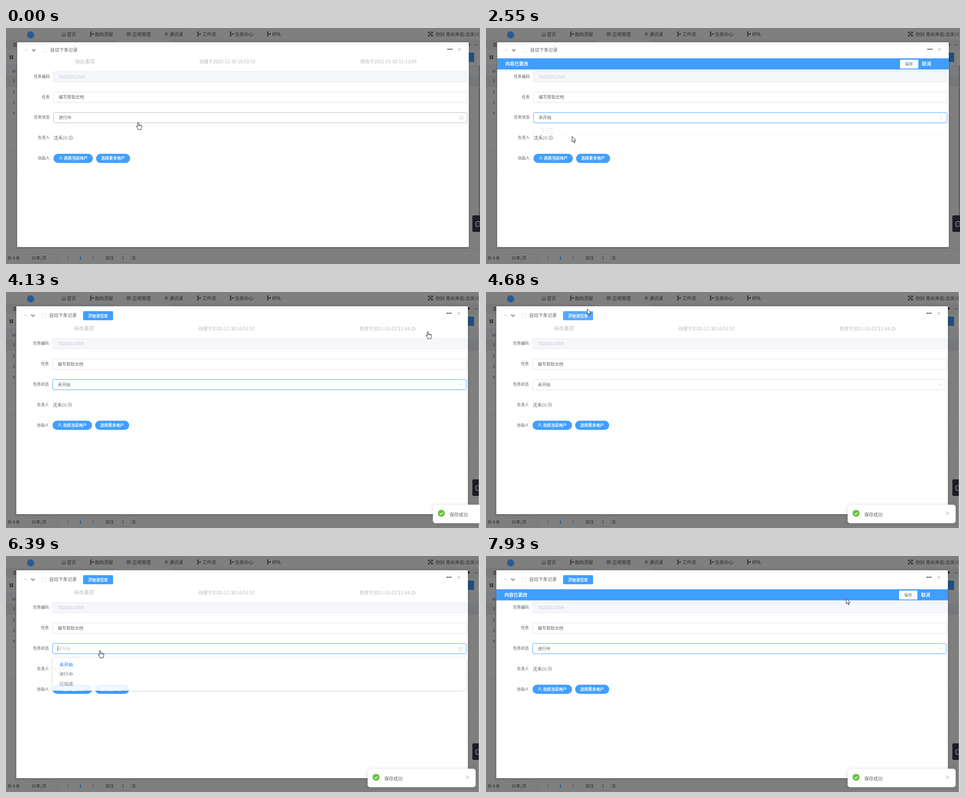
These frames come from a looping animation (1058x529 px, 8000 ms). An HTML page:

```html
<!DOCTYPE html>
<html lang="zh-CN">
<head>
<meta charset="utf-8">
<title>任务表单</title>
<style>
html, body { margin: 0; width: 100%; height: 100%; overflow: hidden; background: #7f7f7f; }
svg { display: block; width: 1058px; height: 529px; }
text { font-family: "Noto Sans CJK SC", "Noto Sans CJK", "Noto Sans", sans-serif; }
.shadow { filter: drop-shadow(0 1px 4px rgba(0,0,0,.13)); }
</style>
</head>
<body>
<svg id="stage" viewBox="0 0 1058 529" xmlns="http://www.w3.org/2000/svg"></svg>
<script>
const LOOP = 8000;
const BLUE = '#409eff', INK = '#606266', PALE = '#c0c4cc', LINE = '#dcdfe6';
const DARK = '#292a2c', DIM_LINE = '#737477', DIM_BLUE = '#204f7f';
const S = 8.8, M = 9.5, L = 10.24;

// Markup helpers; text is placed by its vertical centre.
const text = (x, cy, str, size, fill, extra = '') =>
  `<text x="${x}" y="${cy + size * .375}" font-size="${size}" fill="${fill}" ${extra}>${str}</text>`;
const rect = (x, y, w, h, fill, extra = '') =>
  `<rect x="${x}" y="${y}" width="${w}" height="${h}" fill="${fill}" ${extra}/>`;
const circle = (x, y, r, fill, extra = '') =>
  `<circle cx="${x}" cy="${y}" r="${r}" fill="${fill}" ${extra}/>`;
const line = (d, color, w = 1, extra = '') =>
  `<path d="${d}" fill="none" stroke="${color}" stroke-width="${w}" ${extra}/>`;
const group = (id, body, extra = '') => `<g id="${id}" ${extra}>${body}</g>`;
const cross = (x, y, r, color, w = 1) =>
  line(`M${x - r} ${y - r}l${2 * r} ${2 * r}m0 ${-2 * r}l${-2 * r} ${2 * r}`, color, w);
const chevron = (x, y, r, color, dir = 1, w = 1) =>
  line(`M${x - r} ${y - dir * r / 2}l${r} ${dir * r}l${r} ${-dir * r}`, color, w);
const sideways = (x, y, dir) =>
  line(`M${x - dir * 1.5} ${y - 3}l${dir * 3} 3l${-dir * 3} 3`, DARK, .8);
const person = (x, y, color, w = .9) =>
  circle(x, y - 1.8, 2.1, 'none', `stroke="${color}" stroke-width="${w}"`) +
  line(`M${x - 3.6} ${y + 4}q.2-3.6 3.6-3.6t3.6 3.6`, color, w);
const closeMark = (x, y, color) =>
  circle(x, y, 4.2, 'none', `stroke="${color}" stroke-width=".9"`) + cross(x, y, 1.5, color, .9);
const bold = 'font-weight="700"', mid = 'text-anchor="middle"', end = 'text-anchor="end"';

function flowIcon(x, y) {
  return [[-2.5, -3], [-2.5, 1], [-2.5, 5], [2.5, 1]]
    .map(([a, b]) => rect(x + a - 1.6, y + b - 2, 3, 3, DARK, 'rx=".8"')).join('') +
    line(`M${x - 2} ${y + .5}h4M${x - 2.5} ${y - 3}v7`, DARK, .8);
}

function navBar() {
  const flows = [[192, '我的流程', 198], [431, '工作流', 438], [504, '任务中心', 511], [587, 'RPA', 594]];
  const fourRings = [[-2.4, -2.4], [2.4, -2.4], [-2.4, 2.4], [2.4, 2.4]]
    .map(([a, b]) => circle(274 + a, 13.8 + b, 1.9, 'none', `stroke="${DARK}" stroke-width=".9"`)).join('');
  return circle(55, 15.5, 8, '#285d91') +
    line('M124.5 13.5l4.5-4 4.5 4M125.5 13v5h2.5v-3h2v3h2.5v-5', DARK, .8) +
    text(136, 13.8, '首页', L, DARK) +
    flows.map(([ix, s, x]) => flowIcon(ix, 13) + text(x, 13.8, s, L, DARK)).join('') +
    fourRings + text(282, 13.8, '应用管理', L, DARK) +
    person(357.5, 13.5, DARK) + text(365, 13.8, '通讯录', L, DARK) +
    line('M943 9l9 9M952 9l-9 9M943 12V9h3M949 9h3v3M952 15v3h-3M946 18h-3v-3', DARK, 1.3) +
    text(959, 13.8, '你好 青屿禾拓:沈禾川', L, DARK);
}

function page() {
  let s = rect(0, 0, 1058, 529, '#7f7f7f') + rect(0, 27, 1058, 21, '#797a7c') +
    rect(243, 27, 128, 21, '#808080') + line('M0 26.5H1058M0 48.5H1058', '#757679', .7) + navBar();
  s += text(15, 37.5, '首页', 9.5, DARK) + circle(1032, 37, 3, DARK) + chevron(1048.5, 37.5, 3, DARK, 1, .9);
  s += [[8, 61.5], [12.6, 61.5], [8, 66], [12.6, 66]].map(([x, y]) => rect(x, y, 3.4, 3.4, DARK, 'rx=".6"')).join('');
  s += rect(985, 55, 60, 21, DIM_BLUE, 'rx="2"');
  s += rect(0, 83, 1058, 25, '#7b7c7e') + rect(0, 108, 1058, 23.5, '#757779');
  s += line('M13 96.5q4.5-5.5 9 0q-4.5 5.5-9 0z', '#36495f', .9) + circle(17.5, 96.5, 1.5, '#36495f');
  s += line('M0 83.5H1058M0 108H1058', DIM_LINE, .7);
  for (let i = 0; i < 16; i++) s += line(`M0 ${131.5 + i * 24.15}H1058`, DIM_LINE, .7);
  for (const x of [36, 140, 250, 399, 503]) s += line(`M${x}.5 83V500`, DIM_LINE, .7);
  for (let i = 0; i < 4; i++) s += text(17.5, 118.5 + i * 24, i + 1, S, DARK, mid);
  s += rect(1055, 83, 3, 337, '#626366');
  s += rect(0, 500, 1058, 29, '#7f7f7f') + line('M0 500H1058', DIM_LINE, .7);
  const box = `rx="2" stroke="#6c6d71" stroke-width=".8"`;
  s += text(3, 515, '共 4 条', M, DARK) + rect(43.5, 505.5, 72, 19.5, 'none', box) +
    text(57, 515, '20条/页', M, DARK) + chevron(106.5, 515, 2.6, '#55565a', 1, .8) +
    sideways(137.5, 515, -1) + text(166, 515, '1', M, DIM_BLUE, mid + ' ' + bold) + sideways(194, 515, 1) +
    text(222, 515.5, '前往', M, DARK) + rect(244.5, 505.5, 33, 19.5, 'none', box) +
    text(261, 515, '1', M, DARK, mid) + text(280.5, 515.5, '页', M, DARK);
  s += rect(1041, 420, 20, 37, '#1b1d23', 'rx="3"') +
    line('M1050 445.5v-2.2a5.5 5.5 0 1 1 3 1.2z', '#a9a9a9', 1.2) +
    [1052, 1055, 1058].map(x => circle(x, 439, .8, '#a9a9a9')).join('');
  return s;
}

function modal() {
  const inputBox = (y, fill, stroke, id = '') =>
    rect(106, y, 923.3, 23, fill, `${id} rx="3" stroke="${stroke}" stroke-width="1"`);
  const labels = ['任务编码', '任务', '任务状态', '负责人', '协助人']
    .map((s, i) => text(97.5, 108.5 + i * 45.8, s, S, INK, end)).join('');
  const field = group('dates', text(154, 75.5, '待办事项', 10.97, '#b6b8bc') +
      text(431.5, 75.5, '创建于2020-12-30 16:02:52', L, '#b6b8bc') +
      text(791, 75.5, '', L, '#b6b8bc', 'id="edited"')) +
    group('banner', rect(25, 68, 1008, 25, BLUE) + text(43, 80.5, '内容已更改', L, '#fff', bold) +
      rect(924, 71, 41, 20, '#fff', 'id="save" rx="2"') +
      text(944.3, 81, '保存', S, INK, mid + ' id="saveText"') + text(973, 80.5, '取消', L, '#fff', bold)) +
    labels +
    inputBox(97.7, '#f5f7fa', '#e4e7ed') + text(118, 109, 'TA202012304', M, PALE) +
    inputBox(143.7, '#fff', LINE) + text(117.5, 154.8, '编写帮助文档', M, INK) +
    inputBox(189.7, '#fff', LINE, 'id="status"') + text(117.5, 200.8, '', M, INK, 'id="value"') +
    rect(117, 195, .9, 11, '#303133', 'id="caret"') +
    group('clear', closeMark(1017, 201.3, PALE)) +
    group('arrow', chevron(0, 0, 3.8, PALE, 1, .9)) +
    text(106.3, 246.2, '沈禾川', L, INK) + closeMark(144.5, 246.2, INK) +
    rect(106, 282, 88, 20.4, BLUE, 'rx="10.2"') + person(122, 291.8, '#fff') +
    text(129.3, 292, '选择当前用户', S, '#fff', bold) +
    rect(201, 282, 76, 20.4, BLUE, 'rx="10.2"') + text(212.5, 292, '选择更多用户', S, '#fff', bold);
  const list = rect(106, 0, 922.5, 82, '#fff', 'class="shadow" rx="3" stroke="#e4e7ed" stroke-width=".8"') +
    rect(106.5, 0, 921.5, 24.6, '#f5f7fa', 'id="rowHover"') +
    options.map((s, i) => text(121, 17 + i * 24.3, s, L, INK, `id="opt${i}"`)).join('');
  return rect(0, 32, 1008, 459, '#fff', 'id="panel" rx="1.5" style="filter:drop-shadow(0 1px 2px rgba(0,0,0,.3))"') +
    group('corner', [986.8, 990.8, 994.8].map(x => circle(x, 47.6, 1.4, '#303133')).join('') +
      cross(1012.6, 47.6, 3.5, '#909399', .9)) +
    group('titleRow', chevron(45, 49.8, 3.8, PALE, -1, 1) + chevron(62, 49.8, 3.8, '#303133', 1, 1.2) +
      rect(81.3, 44.5, 9.6, 9.8, '#fff', `rx="1.3" stroke="${LINE}" stroke-width=".8"`) +
      text(98.5, 49.5, '自动下条记录', L, INK)) +
    group('begin', rect(172, 43, 67, 20.3, BLUE, 'id="beginBox" rx="2"') +
      text(205.5, 53.2, '开始该任务', S, '#fff', mid + ' ' + bold)) +
    group('body', field + group('list', list));
}

const options = ['未开始', '进行中', '已完成'];
const toast = rect(807.5, 477, 240.5, 41, '#fff', 'class="shadow" rx="5.5" stroke="#ebeef5" stroke-width=".7"') +
  circle(826, 496, 7.8, '#67c23a') + line('M822.5 496.2l2.6 2.6l4.6-4.8', '#fff', 1.4) +
  text(844.3, 499, '保存成功', L, INK) + cross(1030, 496.2, 3.2, '#909399', .9);
const pen = 'fill="#fff" stroke="#111" stroke-width=".95" stroke-linejoin="round"';
const pointer = `<path id="tip" d="M0 0V12.5L2.9 9.8L5 14.4L6.9 13.6L4.9 9.2H8.8Z" ${pen}/>`;
const hand = group('hand', `<path d="M-1.3 1.3Q0-.7 1.3 1.3V6.3Q2.6 5.2 3.7 6.6Q5 5.6 6.1 7.2Q7.7 6.6 8.2 8.4V11.5Q8 13.5 6.8 15V16.8H-.2V15.3L-3.6 10.6Q-3.9 8.6-2.2 9L-1.3 10.2Z" ${pen}/>` +
  line('M1.3 6v3M3.7 6.6v2.6M6.1 7.2v2.2', '#111', .8));

const stage = document.getElementById('stage');
stage.innerHTML = page() + rect(1055.5, 0, 2.5, 529, '#dedede', 'id="edge"') + modal() +
  group('toast', toast) + group('cursor', pointer + hand);

const ui = {};
stage.querySelectorAll('[id]').forEach(n => ui[n.id] = n);
const set = (id, key, val) => ui[id].setAttribute(key, val);
const show = (id, on) => set(id, 'visibility', on ? 'visible' : 'hidden');
const move = (id, x, y) => set(id, 'transform', `translate(${x} ${y})`);

const clamp = v => Math.max(0, Math.min(1, v));
const inside = (t, spans) => spans.some(([a, b]) => t >= a && t < b);
const outQuint = p => 1 - (1 - clamp(p)) ** 5;
const smooth = p => p * p * (3 - 2 * p);
// 0..1 level that rises after a and falls after b
const fade = (t, a, b, d = 100) => clamp((t - a) / d) * clamp(1 - (t - b) / d);
const mix = (c1, c2, k) => 'rgb(' + [1, 3, 5].map(i => {
  const a = parseInt(c1.substr(i, 2), 16), b = parseInt(c2.substr(i, 2), 16);
  return Math.round(a + (b - a) * k);
}) + ')';

const OPEN = [[1160, 2550], [6300, 7450]];
const SAVED = 4050;
const HAND = [[0, 70], [620, 1660], [1740, 2550], [3280, 4220], [4480, 4610], [5000, 5330], [5950, 6560], [6640, 7450]];
const HOVER = [[0, 70], [620, 1660], [5950, 6560]];
const PATH = [
  [0, 295, 211], [69, 295, 211], [70, 296, 229], [500, 296, 229], [770, 279.5, 198], [1590, 279.5, 198],
  [2000, 194, 239], [2549, 194, 239], [2550, 192, 243], [2630, 192, 243], [3330, 941.5, 88],
  [4220, 941.5, 88], [4540, 222, 52], [4680, 226, 38], [4860, 232, 45], [5080, 228, 50],
  [5300, 172, 54], [5480, 158, 72], [5840, 212, 190], [6070, 210, 211.5], [6420, 210, 211.5],
  [6950, 182, 262], [7090, 182, 262], [7250, 181.5, 267], [7450, 181.5, 267], [7930, 804, 95], [8000, 806, 95]
];

function cursorAt(t) {
  const i = Math.max(1, PATH.findIndex(k => k[0] > t));
  const [t0, x0, y0] = PATH[i - 1], [t1, x1, y1] = PATH[i];
  const k = smooth(clamp((t - t0) / (t1 - t0)));
  return [x0 + (x1 - x0) * k, y0 + (y1 - y0) * k];
}

function listScale(t) {
  for (const [a, b] of OPEN) {
    if (t >= a && t < b) return outQuint((t - a + (a > 6000 ? 20 : 0)) / 300);
    if (t >= b && t < b + 230) return 1 - outQuint((t - b + 75) / 300);
  }
  return 0;
}

function draw(t) {
  const saved = t >= SAVED, open = inside(t, OPEN), dx = saved ? -2 : 0;
  const [cx, cy] = cursorAt(t);
  const hover = inside(t, HOVER);

  set('panel', 'x', 25 + dx);
  set('panel', 'height', saved ? 466 : 459);
  move('corner', dx, 0);
  move('titleRow', dx, saved ? 3 : 0);
  move('body', dx, saved ? 6.5 : 0);
  show('edge', saved);
  show('begin', saved);
  set('beginBox', 'fill', mix(BLUE, '#66b1ff', Math.max(fade(t, 4480, 4640), fade(t, 5000, 5330))));
  ui.edited.textContent = '修改于2021-01-02 11:1' + (saved ? '4:25' : '3:09');

  const changed = inside(t, [[2550, SAVED], [7450, LOOP]]);
  show('banner', changed);
  show('dates', !changed);
  const press = fade(t, 3280, SAVED);
  set('save', 'fill', mix('#ffffff', '#ecf5ff', press));
  set('saveText', 'fill', mix(INK, BLUE, press));

  const focus = inside(t, [[1160, 4200], [6300, LOOP]]);
  const hoverLevel = Math.max(clamp(1 - (t - 130) / 80), fade(t, 620, 1660, 150), fade(t, 5950, 6560, 150));
  set('status', 'stroke', focus ? BLUE : mix(LINE, '#b4b8c0', hoverLevel));
  const chosen = inside(t, [[2550, 7450]]) ? 0 : 1;
  ui.value.textContent = options[chosen];
  set('value', 'fill', open ? PALE : INK);
  show('caret', inside(t, [[1160, 1700], [2240, 2390], [6300, 6800]]));
  show('clear', hover);
  show('arrow', !hover);

  let turn = open ? 180 : 0;
  for (const [, b] of OPEN) if (t >= b && t < b + 225) turn = 180 * (1 - smooth((t - b + 75) / 300)) * -.6;
  set('arrow', 'transform', `translate(1017 201.3) rotate(${turn})`);

  const k = listScale(t);
  show('list', k > .005);
  set('list', 'transform', `translate(0 221.3) scale(1 ${k})`);
  set('list', 'opacity', k);
  const picked = t < 2800 ? 1 : t < 7450 ? 0 : 1;
  options.forEach((_, i) => {
    set('opt' + i, 'fill', i === picked ? BLUE : INK);
    set('opt' + i, 'font-weight', i === picked ? 700 : 400);
  });
  const row = inside(t, [[1740, 2550]]) ? 0 : inside(t, [[6640, 6740]]) ? 0 : inside(t, [[6740, 7450]]) ? 1 : -1;
  set('rowHover', 'opacity', row < 0 ? 0 : 1);
  set('rowHover', 'y', 4.7 + Math.max(row, 0) * 24.3);

  show('toast', saved);
  move('toast', 250 * (1 - clamp((t - 4060) / 300)) ** 2, 0);

  move('cursor', cx, cy);
  const isHand = inside(t, HAND);
  set('hand', 'display', isHand ? 'inline' : 'none');
  set('tip', 'display', isHand ? 'none' : 'inline');
}

const begin = performance.now();
function tick() {
  draw((performance.now() - begin) % LOOP);
  requestAnimationFrame(tick);
}
tick();
</script>
</body>
</html>
```
